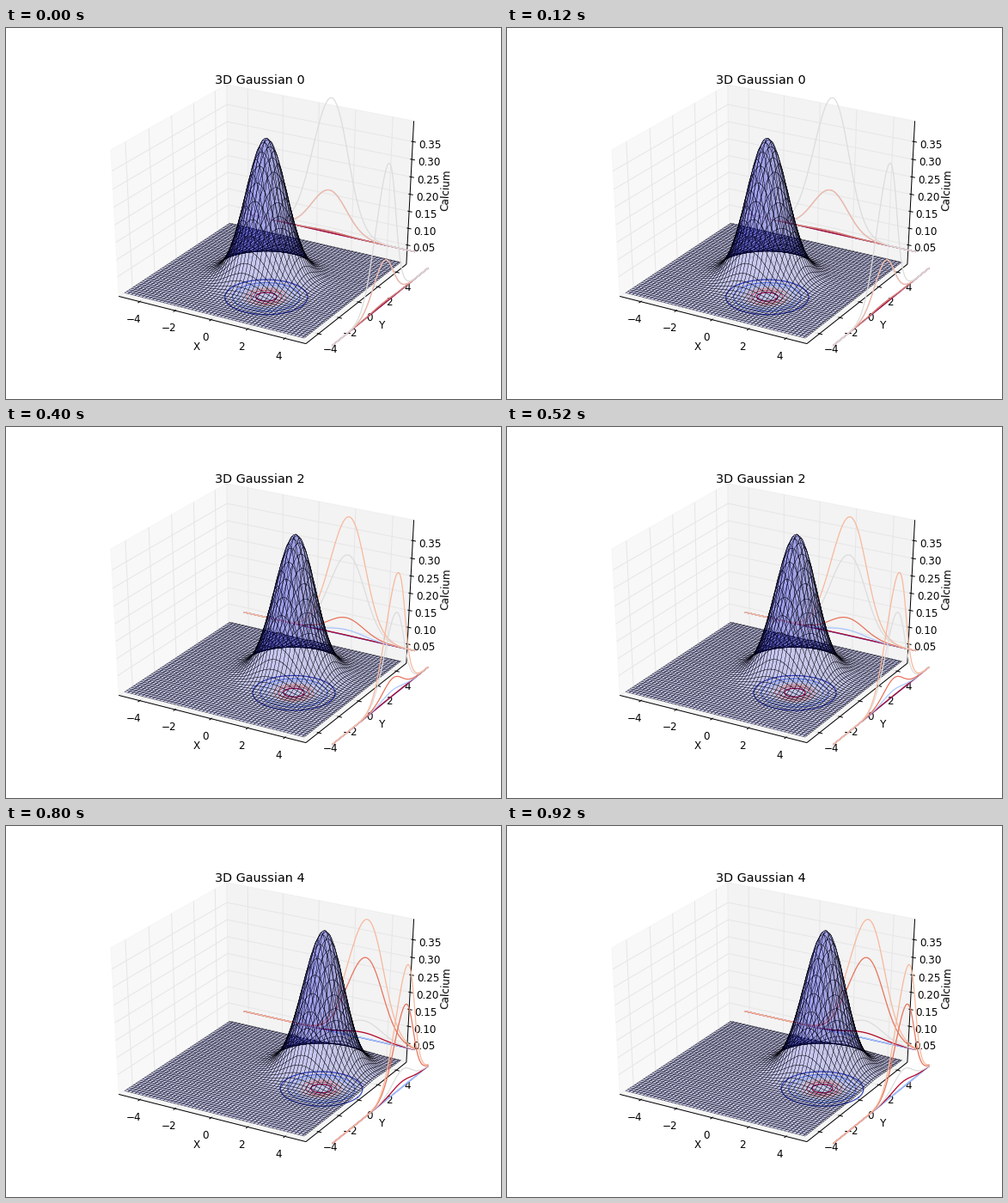
Animation of 576x432 px, one loop 1000 ms. Source, as a matplotlib script:

```python
import numpy as np
import matplotlib.pyplot as plt
from matplotlib.animation import FuncAnimation
from matplotlib.collections import PolyCollection

plt.rcParams["font.family"] = "DejaVu Sans"

W, H = 576, 432
LOW, HIGH = -5.0, 4.9              # x and y range of the sampled surface
PEAK = 1 / np.sqrt(2 * np.pi)      # z range is 0..PEAK
PANE = 0.5 + 1 / 48                # half size of the box in unit coordinates
DELTA = 1 / 12
WALL = 0.65                        # where the projected contours lie
ELEV, AZIM, DIST = np.radians(30), np.radians(-60), 10
FACE_ALPHA, MESH_WIDTH, CURVE_WIDTH = 0.18, 0.3, 1.25
TEXT_SHIFT = 0.6                   # text sits slightly right of and above its anchor

LEFT, BOTTOM, AX_W, AX_H = 72, 43.2, 446.4, 345.6
SE, CE, SA, CA = np.sin(ELEV), np.cos(ELEV), np.sin(AZIM), np.cos(AZIM)


def project(x, y, z):
    """Perspective view of unit-cube points: pixel x, pixel y, depth."""
    x, y, z = np.broadcast_arrays(x, y, z)
    depth = DIST - (CA * CE * x + SA * CE * y + SE * z)
    u = (CA * y - SA * x) / depth
    v = (CE * z - CA * SE * x - SA * SE * y) / depth
    px = LEFT + (u + 0.095) / 0.185 * AX_W
    py = BOTTOM + (v + 0.095) / 0.185 * AX_H
    return px, py, depth


def unit_xy(value):
    return (np.asarray(value) - LOW) / (HIGH - LOW) - 0.5


def unit_z(value):
    return np.asarray(value) / PEAK - 0.5


def gaussian(x, y, mean):
    return PEAK * np.exp(-((x - mean) ** 2 + (y - mean) ** 2) / 2)


fig = plt.figure(figsize=(W / 72, H / 72), dpi=72, facecolor="white")
ax = fig.add_axes([0, 0, 1, 1])
ax.set_xlim(0, W)
ax.set_ylim(0, H)
ax.axis("off")


def polyline(points, color, zorder):
    px, py, _ = project(*np.array(points, float).T)
    ax.plot(px, py, color=color, lw=1, zorder=zorder, solid_capstyle="butt")


def put_text(px, py, text, va, size=12, rotation=0):
    return ax.text(float(px) + TEXT_SHIFT, float(py) + TEXT_SHIFT, text,
                   size=size, ha="center", va=va, rotation=rotation, zorder=4)


def draw_panes():
    p = PANE
    panes = [
        ([(-p, -p, -p), (-p, p, -p), (-p, p, p), (-p, -p, p)], 0.95),
        ([(-p, p, -p), (p, p, -p), (p, p, p), (-p, p, p)], 0.91),
        ([(-p, -p, -p), (p, -p, -p), (p, p, -p), (-p, p, -p)], 0.925),
    ]
    for corners, grey in panes:
        px, py, _ = project(*np.array(corners).T)
        ax.fill(px, py, facecolor=(grey,) * 3, edgecolor=(grey,) * 3,
                alpha=0.5, lw=1, zorder=1)


def draw_axis(index, base, tick_dir, tick_sign, ticks, grid, name):
    """Edge line, grid, ticks and labels of one axis; base is a point on its edge."""
    base = np.array(base, float)
    ends = np.array([base, base])
    ends[:, index] = -PANE, PANE
    polyline(ends, "black", 3)

    away = np.sign(base)
    away[index] = 0
    for place, text in ticks:
        corners = np.array(grid, float)
        corners[:, index] = place
        polyline(corners, "0.9", 2)

        pos = base.copy()
        pos[index] = place
        tick = np.array([pos, pos])
        tick[0, tick_dir] -= 0.1 * DELTA * tick_sign
        tick[1, tick_dir] += 0.2 * DELTA * tick_sign
        polyline(tick, "black", 3)
        px, py, _ = project(*(pos + away * 12 * 48 / 792 * DELTA))
        put_text(px, py, text, "top")

    rotation = 0
    if len(name) > 4:
        px, py, _ = project(*ends.T)
        rotation = np.degrees(np.arctan2(py[1] - py[0], px[1] - px[0]))
    middle = base.copy()
    middle[index] = 0
    px, py, _ = project(*(middle + away * 26 * 48 / 792 * DELTA))
    put_text(px, py, name, "center", rotation=rotation)


def draw_box():
    p = PANE
    flat = [(unit_xy(v), str(v).replace("-", "\u2212")) for v in range(-4, 5, 2)]
    tall = [(unit_z(0.05 * k), f"{0.05 * k:.2f}") for k in range(1, 8)]
    draw_panes()
    draw_axis(0, (0, -p, -p), 1, -1, flat,
              [(0, -p, -p), (0, p, -p), (0, p, p)], "X")
    draw_axis(1, (p, 0, -p), 0, 1, flat,
              [(-p, 0, p), (-p, 0, -p), (p, 0, -p)], "Y")
    draw_axis(2, (p, p, 0), 0, 1, tall,
              [(p, p, 0), (-p, p, 0), (-p, -p, 0)], "Calcium")


# Each cell spans two samples; its outline keeps the samples halfway.
samples = LOW + 0.1 * np.arange(100)
rows, cols = (g.reshape(-1, 1) for g in np.mgrid[0:100:2, 0:100:2])
ring_r = np.array([0, 0, 0, 1, 2, 2, 2, 1])
ring_c = np.array([0, 1, 2, 2, 2, 1, 0, 0])
CELL_X = samples[np.minimum(cols + ring_c, 99)]
CELL_Y = samples[np.minimum(rows + ring_r, 99)]


def surface(mean):
    z = gaussian(CELL_X, CELL_Y, mean)
    px, py, depth = project(unit_xy(CELL_X), unit_xy(CELL_Y), unit_z(z))

    cx, cy = CELL_X.mean(axis=1), CELL_Y.mean(axis=1)
    cz = gaussian(cx, cy, mean)
    nx, ny = (cx - mean) * cz, (cy - mean) * cz
    light = (0.5 - nx - ny) / np.sqrt(1 + nx ** 2 + ny ** 2)
    light = (light - light.min()) / (light.max() - light.min())
    colors = np.zeros((len(light), 4))
    colors[:, 2] = 0.5 + 0.5 * light
    colors[:, 3] = FACE_ALPHA

    order = np.argsort(-depth.mean(axis=1), kind="stable")
    cells = PolyCollection(np.stack([px, py], axis=-1)[order],
                           facecolors=colors[order], edgecolors="black",
                           linewidths=MESH_WIDTH)
    return depth.min(), cells


def contours(mean):
    """Seven level curves on each of the three projection planes."""
    along = unit_xy(samples)
    turn = np.linspace(0, 2 * np.pi, 121)
    for k in range(7):
        color = plt.cm.coolwarm(k / 6)
        radius = np.sqrt(2 * np.log(PEAK / (0.05 * (k + 1))))
        profile = unit_z(gaussian(samples, -4.5 + 1.5 * k, mean))
        yield color, (unit_xy(mean + radius * np.cos(turn)),
                      unit_xy(mean + radius * np.sin(turn)), -WALL)
        yield color, (WALL, along, profile)
        yield color, (along, WALL, profile)


draw_box()
title = put_text(LEFT + AX_W / 2, BOTTOM + 0.92 * AX_H + 5, "", "baseline", 14.4)
moving = []


def update(step):
    while moving:
        moving.pop().remove()
    mean = 0.5 * step
    title.set_text(f"3D Gaussian {step}")

    layers = [surface(mean)]
    for color, points in contours(mean):
        px, py, depth = project(*points)
        layers.append((depth.min(),
                       plt.Line2D(px, py, color=color, lw=CURVE_WIDTH)))

    # The layer that reaches nearest to the viewer is painted last.
    layers.sort(key=lambda layer: -layer[0])
    for place, (_, artist) in enumerate(layers):
        artist.set_zorder(10 + place)
        ax.add_artist(artist)
        moving.append(artist)
    return moving


anim = FuncAnimation(fig, update, frames=5, interval=200, repeat=True,
                     repeat_delay=0, blit=False)
plt.show()
```
